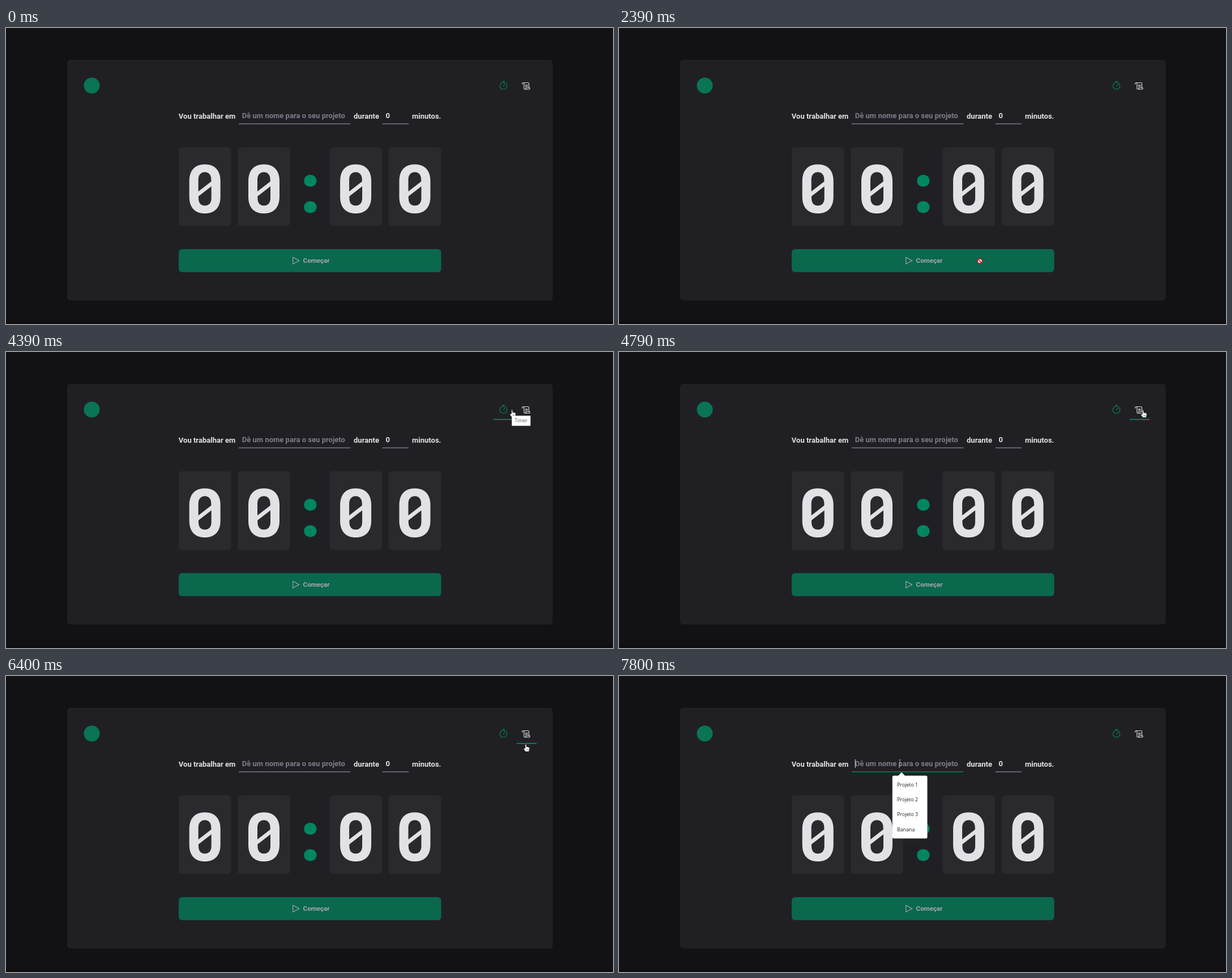
An HTML page for the animation above (8 s loop, 1072 by 522 pixels).

```html
<!DOCTYPE html>
<html lang="pt-BR">
<head>
<meta charset="utf-8">
<title>Timer</title>
<style>
  html, body { margin: 0; width: 100%; height: 100%; overflow: hidden; background: #121214; }
  svg { display: block; width: 100vw; height: 100vh; }
  text { font-family: Roboto, sans-serif; font-weight: 700; font-size: 13.04px; fill: #e1e1e6; }
  .muted { fill: #7c7c8a; }
  .small { font-family: "Open Sans", "Noto Sans", sans-serif; font-weight: 400; font-size: 8.1px; fill: #575757; }
  .item { font-size: 8.8px; fill: #222; }
  .icon { fill: none; stroke-width: 16; stroke-linecap: round; stroke-linejoin: round; }
</style>
</head>
<body>
<svg viewBox="0 0 1072 522">
  <defs>
    <path id="zero" fill="#e1e1e6" fill-rule="evenodd" d="M0-43.3C18-43.3 27.5-32 27.5-14V14C27.5 32 18 43.3 0 43.3S-27.5 32-27.5 14V-14C-27.5-32-18-43.3 0-43.3Z
      M-11.5 4.5L11.2-13V-16C11.2-25 7-29.5 0-29.5S-11.5-25-11.5-16Z
      M11.5-4.5L-11.2 13V16C-11.2 25-7 29.5 0 29.5S11.5 25 11.5 16Z"/>
    <g id="arrow">
      <path d="M0 0V12L2.8 9.4L4.7 13.5L6.5 12.7L4.7 8.7H8.4Z" fill="#fff" stroke="#000" stroke-width=".7"/>
    </g>
    <g id="hand">
      <path d="M-1.1 7V1A1.1 1.1 0 0 1 1.2 1V4.4Q2.4 3.6 3.2 4.7Q4.4 4.1 5 5.2Q6.5 4.8 6.6 6.4V9.2L5.4 13H-.4L-3.8 8.4Q-4 6.6-2.3 7Z" fill="#fff" stroke="#000" stroke-width=".7"/>
      <path d="M1.3 8.3V11M3 8.3V11M4.6 8.3V11" stroke="#222" stroke-width=".5"/>
    </g>
    <g id="blocked">
      <circle r="4.1" fill="#fff" stroke="#d0141c" stroke-width="1.5"/>
      <path d="M-2.8-2.8L2.8 2.8" stroke="#d0141c" stroke-width="1.7"/>
    </g>
    <path id="beam" d="M-1.8-5.3H-.5L0-4.8L.5-5.3H1.8M0-4.8V4.8M-1.8 5.3H-.5L0 4.8L.5 5.3H1.8" fill="none" stroke="#b9b9bd" stroke-width=".8"/>
  </defs>

  <rect width="1072" height="522" fill="#121214"/>
  <rect y="518" width="1072" height="4" fill="#0f0d10"/>
  <rect x="108" y="56" width="857.5" height="424.5" rx="5.8" fill="#202024"/>
  <circle cx="151.5" cy="101.5" r="14" fill="#0a7455"/>

  <g class="icon" stroke="#00875f" transform="translate(869.8 93) scale(.068)">
    <circle cx="128" cy="132" r="92"/>
    <path d="M128 132L168 92M104 20H152"/>
  </g>
  <g class="icon" stroke="#e1e1e6" transform="translate(909.9 93.8) scale(.068)">
    <path d="M30 80A24 24 0 1 1 72 64V184A24 24 0 0 0 96 208H200A24 24 0 0 0 219 168H115A24 24 0 0 1 96 208M48 40H176A24 24 0 0 1 200 64V168M104 104H168M104 136H168"/>
  </g>

  <text x="304.8" y="160">Vou trabalhar em</text>
  <text x="416.8" y="159" class="muted">Dê um nome para o seu projeto</text>
  <text x="614" y="160">durante</text>
  <text x="670.5" y="159">0</text>
  <text x="717" y="160">minutos.</text>
  <rect id="field" x="411" y="168.3" width="197.3" height="1.4"/>
  <rect x="664.7" y="168.3" width="46.3" height="1.4" fill="#7c7c8a"/>

  <g id="digits"></g>
  <g fill="#00875f">
    <rect x="526.3" y="259" width="22.2" height="20.8" rx="10"/>
    <rect x="526.3" y="305.5" width="22.2" height="20.8" rx="10"/>
  </g>

  <rect x="305" y="390" width="463.5" height="40.6" rx="5.8" fill="#0a684d"/>
  <path d="M506.7 404.3V416.2L517.8 410.2Z" fill="none" stroke="#a7a7ac" stroke-width="1.1" stroke-linejoin="round"/>
  <text x="524.6" y="414.3" style="font-size:11.6px;fill:#a7a7ac">Começar</text>

  <rect id="navTimer" x="861" y="118.1" width="35" height="1.8" fill="#00875f"/>
  <rect id="navHistory" x="902" y="118.1" width="35" height="1.8" fill="#00875f"/>
  <circle id="press" cx="495" cy="152" r="8.8" fill="#aaa207" opacity=".88"/>
  <g id="popup">
    <rect x="416.7" y="147" width="1" height="15" fill="#e1e1e6"/>
    <path d="M492.5 176.5L499 169.8L505.5 176.5Z" fill="#fff"/>
    <rect x="482.8" y="175.8" width="61.7" height="110.6" rx="2.5" fill="#fff"/>
  </g>
  <use id="cursor"/>
  <g id="tipTimer">
    <rect x="893.3" y="112.4" width="33" height="17.8" fill="#fff"/>
    <text class="small" x="898.6" y="124">Timer</text>
  </g>
  <g id="tipHistory">
    <rect x="932.3" y="113" width="46.2" height="17.8" fill="#fff"/>
    <text class="small" x="937.6" y="124.6">Histórico</text>
  </g>
</svg>
<script>
const NS = 'http://www.w3.org/2000/svg';
const LOOP = 8000;
const $ = id => document.getElementById(id);

function add(parent, tag, attrs, text = '') {
  const el = document.createElementNS(NS, tag);
  for (const key in attrs) el.setAttribute(key, attrs[key]);
  el.textContent = text;
  parent.append(el);
}

for (const x of [351.2, 455.5, 617.6, 722]) {
  add($('digits'), 'rect', { x: x - 46.4, y: 210.3, width: 92.8, height: 139, rx: 5.8, fill: '#29292e' });
  add($('digits'), 'use', { href: '#zero', x, y: 283.7 });
}
['Projeto 1', 'Projeto 2', 'Projeto 3', 'Banana'].forEach((name, i) =>
  add($('popup'), 'text', { class: 'small item', x: 491.2, y: 195.2 + 26.1 * i }, name));

// Pointer steps: start time, shape, hot spot.
const steps = [
  [580, 'arrow', 668.5, 461.5], [790, 'arrow', 665, 433.5],
  [1170, 'blocked', 648, 419], [1380, 'blocked', 611, 410],
  [1580, 'blocked', 619, 408], [1780, 'blocked', 636, 410],
  [2390, 'blocked', 637.3, 411], [2580, 'arrow', 690, 371],
  [2790, 'arrow', 790, 275], [2990, 'arrow', 886, 177],
  [3190, 'arrow', 925, 127], [3400, 'hand', 893.3, 102.3],
  [4390, 'hand', 893.6, 102], [4590, 'hand', 910, 103],
  [4790, 'hand', 925.5, 102.7], [6200, 'hand', 923, 111],
  [6400, 'hand', 918, 120.5], [6600, 'arrow', 886, 151],
  [6800, 'arrow', 772, 197], [7000, 'arrow', 610, 182],
  [7200, 'beam', 455, 158], [7400, 'beam', 493, 152],
  [7600, 'beam', 495.3, 152.8], [7800, 'beam', 496, 153]
];

// Visible spans of the hover and click states.
const spans = {
  navTimer: [3400, 4590], tipTimer: [3990, 4590],
  navHistory: [4590, 6600], tipHistory: [5390, 6200],
  press: [7600, 7800], popup: [7800, LOOP]
};

function show(id, on) {
  $(id).setAttribute('visibility', on ? 'visible' : 'hidden');
}

function render(t) {
  const step = steps.filter(s => s[0] <= t).pop();
  show('cursor', step);
  if (step) {
    const [, shape, x, y] = step;
    $('cursor').setAttribute('href', '#' + shape);
    $('cursor').setAttribute('transform', `translate(${x} ${y})`);
  }
  for (const id in spans) show(id, t >= spans[id][0] && t < spans[id][1]);
  $('field').setAttribute('fill', t >= spans.popup[0] ? '#00875f' : '#7c7c8a');
}

const start = performance.now();
function tick() {
  render((performance.now() - start) % LOOP);
  requestAnimationFrame(tick);
}
tick();
</script>
</body>
</html>
```
